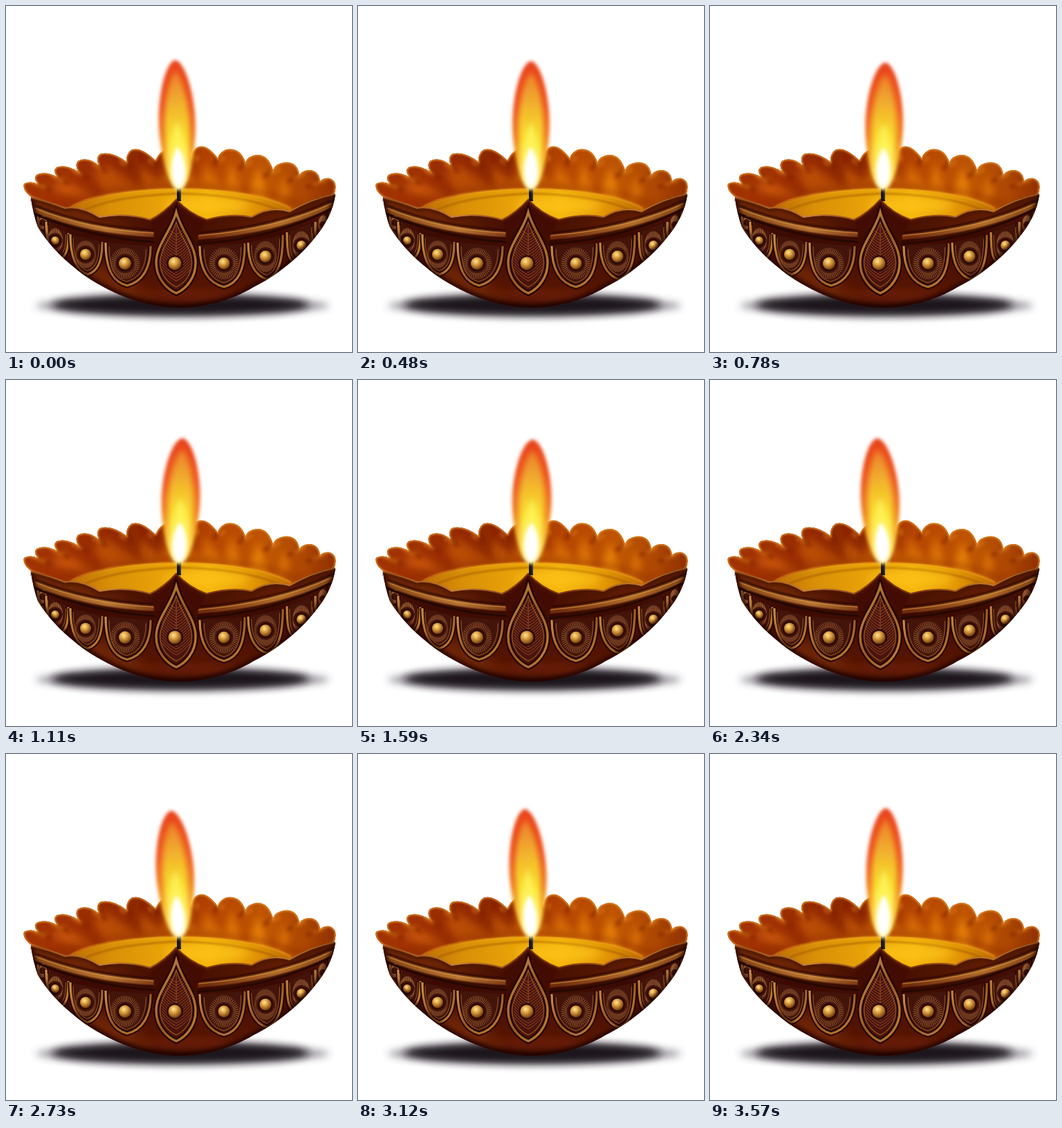
An HTML page that plays this animation: 500 px wide and 500 px high, repeating every 3600 ms.

```html
<!DOCTYPE html>
<html lang="en">
<head>
<meta charset="utf-8">
<title>Oil lamp</title>
<style>
html, body { margin: 0; width: 100%; height: 100%; overflow: hidden; background: #fff; }
svg { display: block; width: 100vw; height: 100vh; }
#sway, #stretch { transform-origin: 250px 264px; }
#sway { animation: sway 3.6s infinite; }
#stretch { animation: stretch 3.6s cubic-bezier(.37, 0, .63, 1) infinite; }
@keyframes sway {
  0% { transform: rotate(-1.7deg); animation-timing-function: cubic-bezier(.3, .2, .6, 1); }
  32% { transform: rotate(1.6deg); animation-timing-function: cubic-bezier(.37, 0, .63, 1); }
  78% { transform: rotate(-3.6deg); animation-timing-function: cubic-bezier(.5, 0, .8, .7); }
  100% { transform: rotate(1.6deg); }
}
@keyframes stretch {
  0%, 100% { transform: scale(.98, 1.005); }
  47% { transform: scale(1.05, .962); }
}
</style>
</head>
<body>
<svg viewBox="0 0 500 500">
  <defs>
    <filter id="b1" x="-20%" y="-20%" width="140%" height="140%"><feGaussianBlur stdDeviation="1"/></filter>
    <filter id="b3" x="-30%" y="-30%" width="160%" height="160%"><feGaussianBlur stdDeviation="2.6"/></filter>
    <filter id="b4" x="-60%" y="-30%" width="220%" height="160%"><feGaussianBlur stdDeviation="4"/></filter>
    <filter id="b6" x="-40%" y="-60%" width="180%" height="220%"><feGaussianBlur stdDeviation="6"/></filter>
    <filter id="b10" x="-50%" y="-80%" width="200%" height="260%"><feGaussianBlur stdDeviation="10"/></filter>
    <linearGradient id="wall">
      <stop offset="0" stop-color="#b64a0c"/><stop offset=".14" stop-color="#c4520a"/>
      <stop offset=".32" stop-color="#b44a05"/><stop offset=".48" stop-color="#c25a06"/>
      <stop offset=".62" stop-color="#d86e06"/><stop offset=".76" stop-color="#e88209"/>
      <stop offset=".9" stop-color="#d4690a"/><stop offset="1" stop-color="#a23d08"/>
    </linearGradient>
    <linearGradient id="shade">
      <stop offset="0" stop-color="#9a2c04"/><stop offset=".2" stop-color="#8e2201"/>
      <stop offset=".4" stop-color="#7c1800"/><stop offset=".6" stop-color="#a93802"/>
      <stop offset=".8" stop-color="#b04703"/><stop offset="1" stop-color="#8a2c04"/>
    </linearGradient>
    <linearGradient id="oil">
      <stop offset="0" stop-color="#b96806"/><stop offset=".2" stop-color="#d98f07"/>
      <stop offset=".45" stop-color="#eaa508"/><stop offset=".62" stop-color="#f4b50c"/>
      <stop offset=".82" stop-color="#e29405"/><stop offset="1" stop-color="#b76204"/>
    </linearGradient>
    <linearGradient id="body" x1="0" y1="275" x2="0" y2="436" gradientUnits="userSpaceOnUse">
      <stop offset="0" stop-color="#5a1704"/><stop offset=".35" stop-color="#3a0a02"/>
      <stop offset=".62" stop-color="#4d1003"/><stop offset=".85" stop-color="#571603"/>
      <stop offset="1" stop-color="#2b0803"/>
    </linearGradient>
    <linearGradient id="band">
      <stop offset="0" stop-color="#6d2807"/><stop offset=".2" stop-color="#6a2406"/>
      <stop offset=".36" stop-color="#4c1203"/><stop offset=".47" stop-color="#400b03"/>
      <stop offset=".64" stop-color="#4f1403"/><stop offset=".82" stop-color="#611c04"/>
      <stop offset="1" stop-color="#4d1804"/>
    </linearGradient>
    <linearGradient id="gold" x1="0" y1="0" x2="1" y2="1">
      <stop offset="0" stop-color="#d29046"/><stop offset=".5" stop-color="#9a5823"/><stop offset="1" stop-color="#c48238"/>
    </linearGradient>
    <linearGradient id="line" x1="36" y1="0" x2="475" y2="0" gradientUnits="userSpaceOnUse">
      <stop offset="0" stop-color="#8c4a18"/><stop offset=".25" stop-color="#c8823a"/>
      <stop offset=".45" stop-color="#7a3211"/><stop offset=".58" stop-color="#7a3211"/>
      <stop offset=".82" stop-color="#c07a2e"/><stop offset="1" stop-color="#8a4a16"/>
    </linearGradient>
    <radialGradient id="ball" cx=".4" cy=".33" r=".7">
      <stop offset="0" stop-color="#ffe596"/><stop offset=".4" stop-color="#dca040"/><stop offset="1" stop-color="#6c3408"/>
    </radialGradient>
    <linearGradient id="outer" x1="0" y1="78" x2="0" y2="266" gradientUnits="userSpaceOnUse">
      <stop offset="0" stop-color="#e8431c"/><stop offset=".35" stop-color="#ee5520"/>
      <stop offset=".58" stop-color="#f07a22"/><stop offset=".75" stop-color="#f6ac24"/>
      <stop offset=".9" stop-color="#fcd850"/><stop offset="1" stop-color="#fff0a8"/>
    </linearGradient>
    <linearGradient id="inner" x1="0" y1="92" x2="0" y2="264" gradientUnits="userSpaceOnUse">
      <stop offset="0" stop-color="#ec7a28"/><stop offset=".2" stop-color="#efa02e"/>
      <stop offset=".4" stop-color="#f4c42c"/><stop offset=".6" stop-color="#f8e030"/>
      <stop offset=".8" stop-color="#fff27a"/><stop offset="1" stop-color="#fffbe0"/>
    </linearGradient>
    <path id="back" d="M38 277 C29 271 24 264 26 257 Q34 252 46 257 Q39 249 44 244 Q56 238 74 247 Q67 238 73 233 Q86 228 104 239 Q99 229 104 224 Q117 217 134 230 Q129 219 136 214 Q152 209 174 225 Q173 214 181 208 Q194 202 216 223 Q222 210 232 207 Q250 202 268 219 Q270 205 280 203 Q292 201 306 220 Q308 211 319 207 Q339 204 346 226 Q349 217 362 215 Q379 214 386 237 Q389 228 402 226 Q421 224 424 244 Q429 237 439 237 Q452 238 454 253 Q460 248 468 249 Q481 254 474 273 L410 297 L250 330 L90 295 Z"/>
    <path id="bowl" d="M36 277 Q62 283 85 292 Q108 288 135 305 Q173 298 208 309 Q228 300 246 280 Q264 300 290 309 Q325 299 355 305 Q382 288 410 297 Q440 279 476 272 C473 295 462 316 446 335 C425 362 392 389 358 406 C325 426 285 436 249 436 C210 435 168 424 122 395 C95 377 65 351 46 319 Q39 300 36 277 Z"/>
    <path id="rim" d="M36 277 Q62 283 85 292 Q108 288 135 305 Q173 298 208 309 Q228 300 246 280 Q264 300 290 309 Q325 299 355 305 Q382 288 410 297 Q440 279 475 272"/>
    <path id="bands" d="M41 294 Q120 326 214 330 M277 334 Q390 325 472 287"/>
    <path id="leaf" d="M246 298 C239 325 217 345 217 371 C217 393 232 409 246 415 C260 409 274 393 274 371 C274 345 253 325 246 298 Z"/>
    <clipPath id="backClip"><use href="#back"/></clipPath>
    <clipPath id="bowlClip"><use href="#bowl"/></clipPath>
    <clipPath id="leafClip"><use href="#leaf"/></clipPath>
  </defs>

  <ellipse cx="255" cy="433" rx="212" ry="11" fill="#3a3040" opacity=".6" filter="url(#b6)"/>
  <ellipse cx="252" cy="432" rx="186" ry="16" fill="#1d161c" filter="url(#b6)"/>

  <use href="#back" fill="url(#wall)"/>
  <g clip-path="url(#backClip)">
    <use href="#back" fill="none" stroke="url(#shade)" stroke-width="38" opacity=".75" filter="url(#b6)"/>
    <g id="folds" fill="none" filter="url(#b3)"/>
    <path d="M72 292 Q110 264 250 259 Q395 264 430 292" fill="none" stroke="#8a2f02" stroke-width="8" opacity=".45" filter="url(#b4)"/>
    <ellipse cx="252" cy="308" rx="168" ry="44" fill="url(#oil)"/>
    <path d="M92 292 Q130 267 250 264 Q370 267 412 293" fill="none" stroke="#eda61c" stroke-width="2.5" opacity=".75" filter="url(#b1)"/>
    <path d="M108 298 Q150 275 250 271 Q352 274 398 297" fill="none" stroke="#a05a05" stroke-width="3" opacity=".55" filter="url(#b1)"/>
    <ellipse cx="290" cy="288" rx="62" ry="12" fill="#ffc81e" opacity=".6" filter="url(#b6)"/>
    <use href="#back" fill="none" stroke="#e08a2c" stroke-width="3" filter="url(#b1)"/>
  </g>

  <use href="#bowl" fill="url(#body)"/>
  <g clip-path="url(#bowlClip)">
    <ellipse cx="150" cy="396" rx="60" ry="14" fill="#96400e" opacity=".45" filter="url(#b10)" transform="rotate(28 150 396)"/>
    <ellipse cx="262" cy="420" rx="70" ry="9" fill="#8a2c08" opacity=".45" filter="url(#b6)"/>
    <path d="M30 270 H480 V290 Q390 335 275 341 L246 302 L215 339 Q130 334 42 301 Z" fill="url(#band)"/>
    <use href="#bands" fill="none" stroke="#200500" stroke-width="14" opacity=".75" filter="url(#b1)"/>
    <use href="#bands" fill="none" stroke="url(#line)" stroke-width="8" opacity=".9" filter="url(#b1)"/>
    <use href="#bands" fill="none" stroke="#e0a04c" stroke-width="1.6" opacity=".55" transform="translate(0 -2)"/>
    <path d="M208 309 Q228 300 246 280 Q264 300 290 309 L275 338 L246 300 L216 336 Z" fill="#430c03" opacity=".8"/>
    <g id="petals"/>
    <path d="M42 301 Q125 336 215 341 M276 344 Q385 337 470 293" fill="none" stroke="#250801" stroke-width="3"/>
    <use href="#leaf" fill="#4a140a" stroke="#220601" stroke-width="8"/>
    <g id="veins" clip-path="url(#leafClip)" fill="none" stroke="#98502f" stroke-width=".9"/>
    <use href="#leaf" fill="none" stroke="url(#gold)" stroke-width="3.4"/>
    <use href="#leaf" fill="none" stroke="#9c5c2a" stroke-width="1.4" transform="translate(49.2 74) scale(.8)"/>
    <g id="knobs"/>
    <path d="M36 277 Q39 300 46 319 C65 351 95 377 122 395 C168 424 210 435 249 436 C285 436 325 426 358 406 C392 389 425 362 446 335 C462 316 473 295 476 272" fill="none" stroke="#1c0502" stroke-width="9" opacity=".7" filter="url(#b3)"/>
  </g>
  <use href="#rim" fill="none" stroke="#4c1703" stroke-width="5" transform="translate(0 3)" opacity=".6" filter="url(#b1)"/>
  <use href="#rim" fill="none" stroke="url(#line)" stroke-width="2"/>

  <path d="M250 263 V282" stroke="#17151a" stroke-width="6"/>
  <path d="M252 266 V280" stroke="#45434f" stroke-width="1.4"/>
  <g id="sway"><g id="stretch">
    <path d="M250 79 C265 82 277 130 277 170 C277 206 267 262 250 266 C233 262 223 206 223 170 C223 130 235 82 250 79 Z" fill="url(#outer)" filter="url(#b3)"/>
    <path d="M250 96 C258 100 268 138 268 172 C268 206 262 258 250 263 C238 258 232 206 232 172 C232 138 242 100 250 96 Z" fill="url(#inner)" filter="url(#b4)"/>
    <path d="M250 168 C256 176 261 202 261 222 C261 242 258 258 250 262 C242 258 239 242 239 222 C239 202 244 176 250 168 Z" fill="#fff45c" opacity=".85" filter="url(#b4)"/>
    <path d="M250 204 C255 210 260 224 260 238 C260 250 257 260 250 263 C243 260 240 250 240 238 C240 224 245 210 250 204 Z" fill="#fff" filter="url(#b3)"/>
  </g></g>
</svg>
<script>
const $ = id => document.getElementById(id);
const add = (parent, tag, attrs) => {
  const el = document.createElementNS('http://www.w3.org/2000/svg', tag);
  for (const k in attrs) el.setAttribute(k, attrs[k]);
  parent.append(el);
  return el;
};

// short creases below the notches of the back rim
const notches = [[46, 257], [74, 247], [104, 239], [134, 230], [174, 225], [216, 223],
  [268, 219], [306, 220], [346, 226], [386, 237], [424, 244], [454, 253]];
for (const [x, y] of notches) {
  const dx = (250 - x) * .1, s = x < 250 ? 1 : -1;
  const fold = (off, len) => `M${x + off} ${y - 3} q${dx * .2} ${len / 2} ${dx} ${len}`;
  add($('folds'), 'path', { d: fold(0, 13), stroke: '#7a2002', 'stroke-width': 5, opacity: .6 });
  add($('folds'), 'path', { d: fold(-9 * s, 8), stroke: '#ee8a22', 'stroke-width': 5, opacity: .45 });
}

function knob(x, y, r) {
  add($('knobs'), 'circle', { cx: x, cy: y, r: r + 2.5, fill: '#2c0b02' });
  add($('knobs'), 'circle', { cx: x, cy: y, r, fill: 'url(#ball)' });
}

// shield between two top corners and a lower point, with rays around its knob
function petal(x1, y1, x2, y2, bx, by, cx, cy, r) {
  const w = x2 - x1, g = add($('petals'), 'g', {});
  const shape = k => {
    const p = (x, y) => `${cx + (x - cx) * k} ${cy + (y - cy) * k}`;
    return `M${p(x1, y1)} C${p(x1, y1 + (by - y1) * .65)} ${p(bx - w * .3, by - 5)} ${p(bx, by)}` +
      ` C${p(bx + w * .3, by - 5)} ${p(x2, y2 + (by - y2) * .65)} ${p(x2, y2)}`;
  };
  add(g, 'path', { d: shape(1), fill: '#43140a', stroke: '#220601', 'stroke-width': 7 });
  let rays = '';
  for (let i = 0; i < 44; i++) {
    const a = i * Math.PI / 22, c = Math.cos(a), s = Math.sin(a);
    const rx = w * .33, ry = (by - (y1 + y2) / 2) * .38;
    rays += `M${cx + c * (r + 5)} ${cy + s * (r + 5)}L${cx + c * rx} ${cy + s * ry}`;
  }
  add(g, 'path', { d: rays, stroke: '#ae7040', 'stroke-width': .8 });
  add(g, 'path', { d: shape(1), fill: 'none', stroke: 'url(#gold)', 'stroke-width': 3.2 });
  add(g, 'path', { d: shape(.82), fill: 'none', stroke: '#8a4d22', 'stroke-width': 1.2 });
  if (r) knob(cx, cy, r);
}
petal(46, 302, 62, 314, 56, 334, 53, 313, 0);
petal(58, 312, 90, 328, 77, 367, 71, 339, 6);
petal(93, 330, 139, 341, 118, 388, 115, 359, 8);
petal(144, 342, 209, 347, 175, 404, 172, 372, 9);
petal(280, 347, 345, 343, 315, 406, 315, 372, 8.5);
petal(350, 342, 400, 331, 377, 395, 375, 362, 8.5);
petal(406, 327, 445, 313, 420, 374, 427, 346, 7);
petal(447, 312, 468, 297, 452, 340, 458, 316, 0);
knob(244, 372, 9.5);

let veins = 'M246 318V362';
for (let i = 0; i < 17; i++) {
  const y = 330 + i * 4.2;
  for (const s of [-1, 1]) veins += `M246 ${y}q${8 * s} -3 ${21 * s} -17`;
}
add($('veins'), 'path', { d: veins });
</script>
</body>
</html>
```
